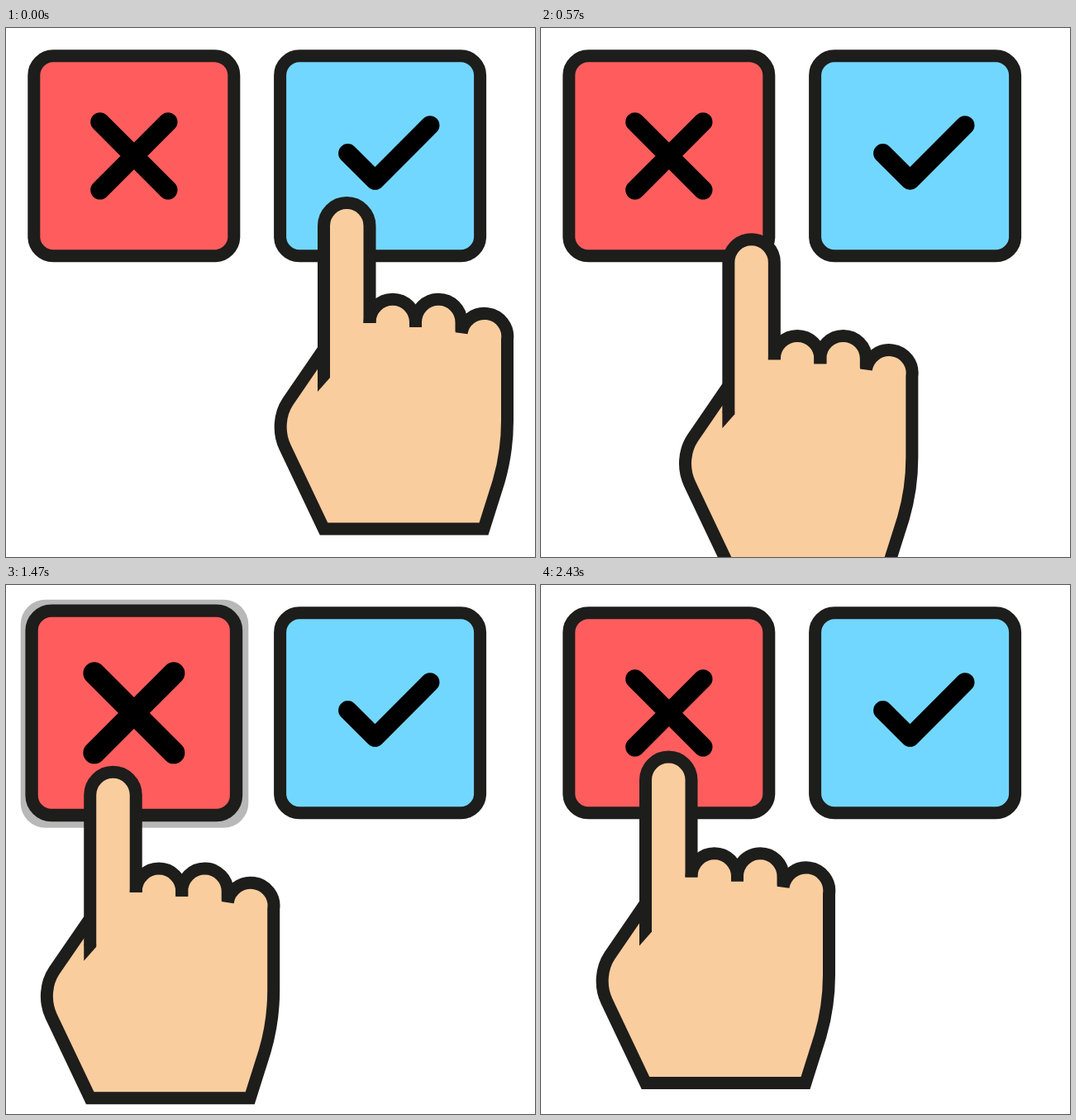
An HTML page that plays this animation: 640x640 px, repeating every 2.81 s.

```html
<!DOCTYPE html>
<html lang="en">
<head>
<meta charset="utf-8">
<title>Choosing a button</title>
<style>
  html, body { margin: 0; width: 100%; height: 100%; overflow: hidden; background: #fff; }
  svg { display: block; width: 100%; height: 100%; }
  .tile { stroke: #1d1d1b; stroke-width: 15; }
  .mark { fill: none; stroke: #000; stroke-width: 23; stroke-linecap: round; stroke-linejoin: round; }
  .line { fill: none; stroke: #1d1d1b; stroke-width: 15; }
  .skin { fill: #facd9e; }
</style>
</head>
<body>
<svg viewBox="0 0 640 640">
  <rect id="shadow" x="17.7" y="17.7" width="275.6" height="276" rx="30" opacity="0"/>
  <rect id="noTile" class="tile" x="33.8" y="33.8" width="242" height="242" rx="23.5" fill="#ff5d5d"/>
  <path id="cross" class="mark" d="M113.7 113.7 196 196M196 113.7 113.7 196"/>
  <rect class="tile" x="331.6" y="33.8" width="242" height="242" rx="23.5" fill="#72d7ff"/>
  <path class="mark" d="M413.6 151.6 446.5 184.3 513 117.7"/>

  <g id="hand">
    <path class="skin" d="M384.5 240a27.75 28 0 0 1 55.5 0V356a27.75 27.75 0 0 1 55.5 0
      a27.75 27.75 0 0 1 55.5 0V370A28 27.5 0 0 1 606.5 377V475
      C606.5 498 603 525 596 549L578 606H384.5L337.5 507C329 489 331 467 341 452L384.5 389Z"/>
    <path class="line" d="M384.5 388.6 341 452C331 467 329 489 337.5 507L384.5 606H578
      L596 549C603 525 606.5 498 606.5 475V377A27.75 27.5 0 0 0 551 369.3"/>
    <path class="line" d="M440 357V356a27.75 27.75 0 0 1 55.5 0v6"/>
    <path class="line" d="M495.5 362v-6a27.75 27.75 0 0 1 55.5 0v11"/>
    <path class="line" d="M384.5 421V239.5a27.75 28 0 0 1 55.5 0V357"/>
    <path d="M377 420V440L392 423V420Z" fill="#1d1d1b"/>
  </g>
</svg>
<script>
  const LOOP = 2810;
  const $ = id => document.getElementById(id);
  const clamp01 = v => Math.min(1, Math.max(0, v));
  const progress = (t, from, to) => clamp01((t - from) / (to - from));
  // Rises linearly from start to peak, then falls back to zero at end.
  const pulse = (t, start, peak, end) =>
    t < peak ? progress(t, start, peak) : 1 - progress(t, peak, end);

  // Each leg of the hand's route is travelled at constant speed.
  const legs = [
    [0, 1000, 'M0 0C-94 27-200 58-283 73'],
    [1000, 1700, 'M-283 73C-317.3 58.3-284 18-266 -11.5'],
    [1700, 2160, 'M-266 -11.5C-262-18-253-17-258-3.5']
  ].map(([from, to, d]) => {
    const path = document.createElementNS('http://www.w3.org/2000/svg', 'path');
    path.setAttribute('d', d);
    return { from, to, path, length: path.getTotalLength() };
  });

  function handOffset(t) {
    const leg = legs.find(l => t < l.to) || legs[legs.length - 1];
    return leg.path.getPointAtLength(leg.length * progress(t, leg.from, leg.to));
  }

  // Motion runs at 25 steps per second, shown on a 30 per second clock.
  function stepTime(t) {
    const tick = Math.floor((t + 5) * 0.03);
    return Math.ceil(tick * 5 / 6 - 0.5) * 40;
  }

  function setScale(el, s) {
    el.setAttribute('transform', `translate(154.8 154.8) scale(${s}) translate(-154.8 -154.8)`);
  }

  function draw(now) {
    const t = stepTime(now % LOOP);
    const press = pulse(t, 1200, 1700, 2440);
    const { x, y } = handOffset(t);
    $('hand').setAttribute('transform', `translate(${x} ${y})`);
    $('shadow').setAttribute('opacity', 0.5 * pulse(t, 1200, 1700, 2200));
    setScale($('noTile'), 1 + 0.04 * press);
    setScale($('cross'), 1 + 0.3 * press);
  }

  const start = performance.now();
  function frame() {
    draw(performance.now() - start);
    requestAnimationFrame(frame);
  }
  frame();
</script>
</body>
</html>
```
